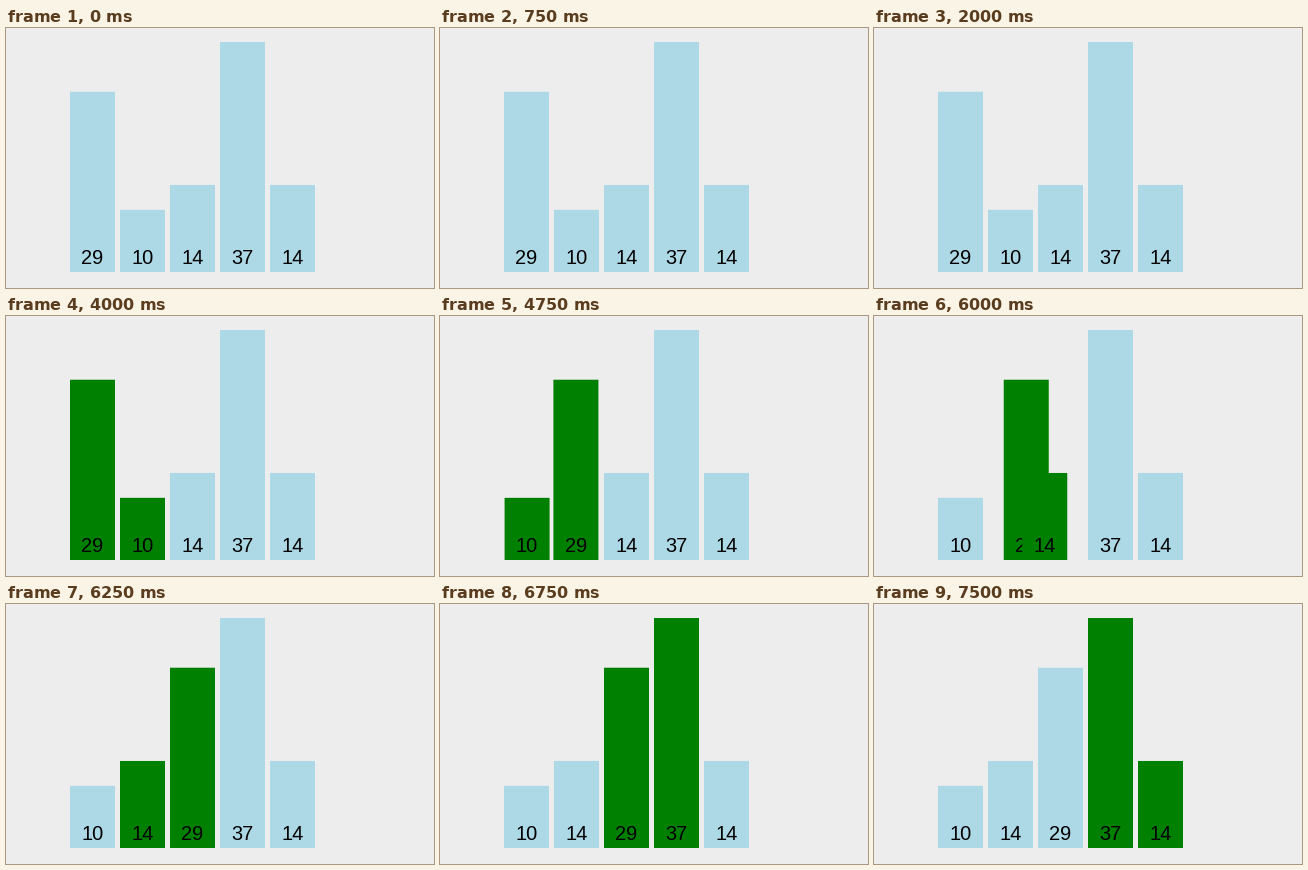
A matplotlib script that plays this animation: 428x260 px, repeating every 8000 ms.

```python
import matplotlib.pyplot as plt
from matplotlib.animation import FuncAnimation
from matplotlib.patches import Rectangle

W, H, DPI = 428, 260, 100
STEP, LOOP = 250, 8000

VALUES = [29, 10, 14, 37, 14]
LEFT, PITCH, BAR_W = 64, 50, 45
BASE, SCALE = 244, 230 / 37
IDLE, ACTIVE = "#add8e6", "#008000"

# time the comparison starts, bars being compared
COMPARES = [(4000, (0, 1)), (5500, (0, 2)), (6750, (0, 3)), (7500, (3, 4))]
# time the swap starts, bar moving right, bar moving left
SWAPS = [(4450, 0, 1), (5850, 0, 2)]
SWAP_MS = 350


def ease(t):
    """Cubic in-out, clamped to 0..1."""
    t = min(max(t, 0), 1)
    return 4 * t ** 3 if t < 0.5 else 1 - 4 * (1 - t) ** 3


def slots(ms):
    pos = [float(i) for i in range(len(VALUES))]
    for start, right, left in SWAPS:
        k = ease((ms - start) / SWAP_MS)
        pos[right] += k
        pos[left] -= k
    return pos


def compared(ms):
    pair = ()
    for start, bars_ in COMPARES:
        if ms >= start:
            pair = bars_
    return pair


fig = plt.figure(figsize=(W / DPI, H / DPI), dpi=DPI, facecolor="#ededed")
ax = fig.add_axes([0, 0, 1, 1])
ax.set_xlim(0, W)
ax.set_ylim(H, 0)
ax.axis("off")

bars, labels = [], []
for i, v in enumerate(VALUES):
    bar = Rectangle((0, BASE - v * SCALE), BAR_W, v * SCALE,
                    lw=0, snap=False, zorder=2 * i + 1)
    bars.append(ax.add_patch(bar))
    labels.append(ax.text(0, 236, str(v), family="Liberation Sans",
                          size=20 * 72 / DPI, color="black", ha="center",
                          va="baseline", zorder=2 * i + 2))


def draw(frame):
    ms = frame * STEP
    pair = compared(ms)
    for i, slot in enumerate(slots(ms)):
        x = LEFT + PITCH * slot
        bars[i].set_x(x)
        bars[i].set_facecolor(ACTIVE if i in pair else IDLE)
        labels[i].set_x(x + BAR_W / 2)
    return bars + labels


anim = FuncAnimation(fig, draw, frames=LOOP // STEP, interval=STEP,
                     init_func=lambda: draw(0), repeat=True, repeat_delay=0)
plt.show()
```
